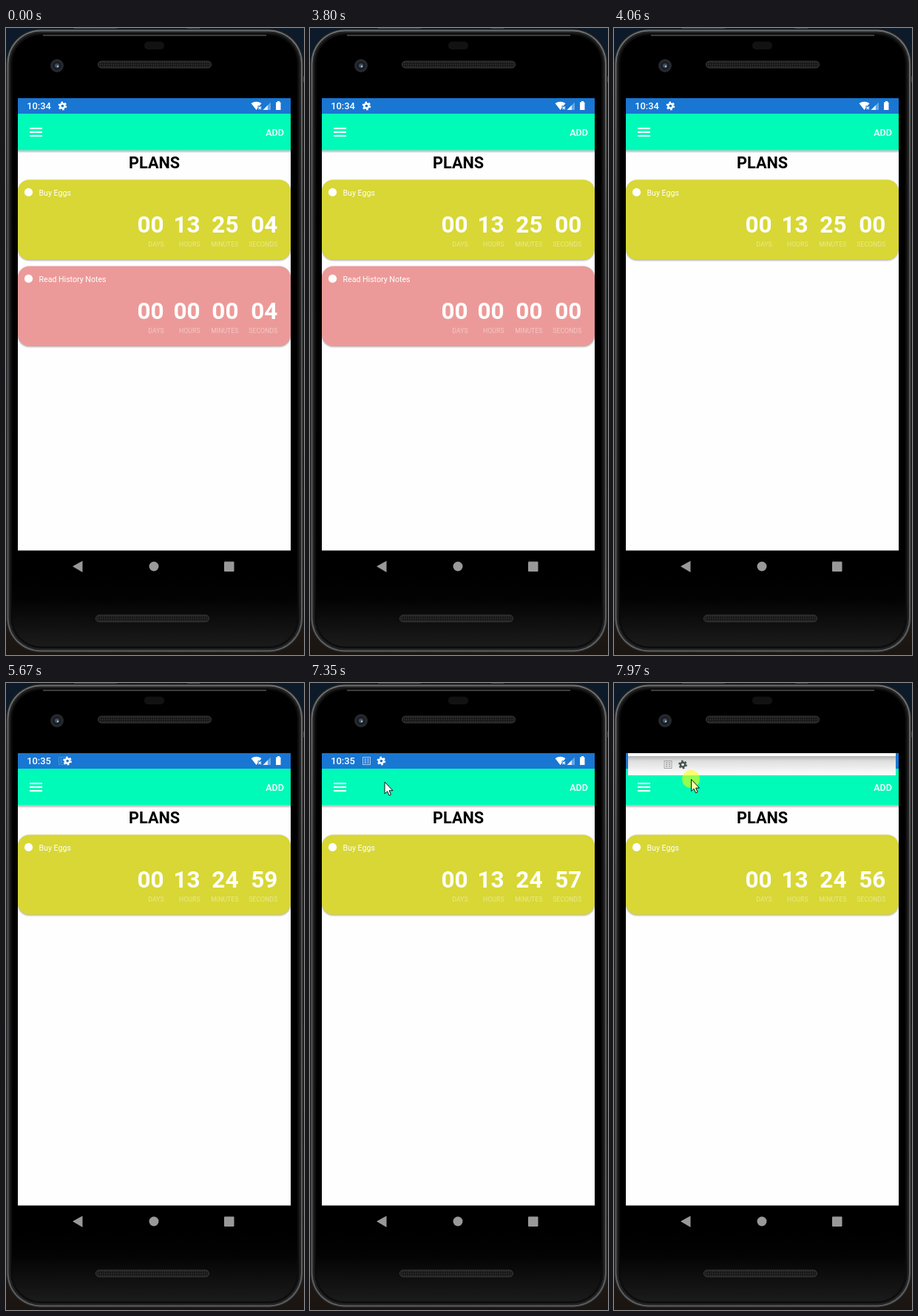
Recreate the animation shown at these times as an HTML page. Size 403x849 px, loop 8 s.

```html
<!DOCTYPE html>
<html lang="en">
<head>
<meta charset="utf-8">
<title>Plans countdown</title>
<style>
  html, body { margin: 0; width: 100%; height: 100%; overflow: hidden; background: #0b1724; }
  svg { display: block; width: 403px; height: 849px; font-family: Roboto, "Open Sans", sans-serif; }
  .num { font-weight: 700; font-size: 31.5px; fill: #fff; text-anchor: end; }
  .unit { font-size: 8.75px; fill: #fff; fill-opacity: .45; text-anchor: end; }
  .name { font-size: 10.6px; fill: #fff; }
  .medium { font-weight: 500; fill: #fff; }
  .card { filter: drop-shadow(0 1.2px 1px rgba(0, 0, 0, .35)); }
</style>
</head>
<body>
<svg viewBox="0 0 403 849">
  <defs>
    <linearGradient id="back" x2="0" y2="1">
      <stop offset="0" stop-color="#0c1a2a"/><stop offset=".6" stop-color="#10151d"/>
      <stop offset=".8" stop-color="#2c231d"/><stop offset="1" stop-color="#1a1511"/>
    </linearGradient>
    <linearGradient id="rim" x2="0" y2="1">
      <stop offset="0" stop-color="#6e7070"/><stop offset=".3" stop-color="#515353"/>
      <stop offset="1" stop-color="#5c5e5e"/>
    </linearGradient>
    <linearGradient id="chin" x2="0" y2="1">
      <stop offset="0" stop-color="#000"/><stop offset=".35" stop-color="#030303"/>
      <stop offset="1" stop-color="#1b1b1b"/>
    </linearGradient>
    <linearGradient id="barShade" x2="0" y2="1">
      <stop offset="0" stop-color="#000" stop-opacity=".32"/><stop offset="1" stop-color="#000" stop-opacity="0"/>
    </linearGradient>
    <linearGradient id="panelFill" x2="0" y2="1">
      <stop offset="0" stop-color="#b4b4b4"/><stop offset=".25" stop-color="#dedede"/>
      <stop offset="1" stop-color="#fff"/>
    </linearGradient>
    <pattern id="mesh" width="3" height="3" patternUnits="userSpaceOnUse">
      <rect width="3" height="3" fill="#161616"/><circle cx="1.5" cy="1.5" r=".9" fill="#323232"/>
    </pattern>
    <clipPath id="screen"><rect x="16" y="95" width="369" height="612.5"/></clipPath>
    <g id="gear" fill="none" stroke="currentColor">
      <circle r="3.1" stroke-width="2.5"/>
      <circle r="4.8" stroke-width="2.2" stroke-dasharray="2.51"/>
    </g>
    <g id="sheet" fill="none" stroke="currentColor">
      <rect x="-5" y="-5" width="10" height="10"/>
      <path d="M-3-2.5H-.5M-3 0H-.5M-3 2.5H-.5M.8-2.5H3.2M.8 0H3.2M.8 2.5H3.2" stroke-width="1.3"/>
    </g>
  </defs>

  <!-- phone body -->
  <rect width="403" height="849" fill="url(#back)"/>
  <path d="M92 .5H150M245 .5H262M308 2H320" stroke="#35424e"/>
  <path d="M0 69.5H7M396 69.5H403M0 235H6" stroke="#707070" stroke-width="8"/>
  <path d="M402 275V350M402 462V580" stroke="#151f2c" stroke-width="2"/>
  <path d="M64 844H78M323 844H337" stroke="#5a5a5a" stroke-width="4"/>
  <rect x="0" y="1" width="402.5" height="845" rx="47" fill="#1f2021"/>
  <rect x="1.5" y="2.5" width="399.5" height="842" rx="45.5" fill="url(#rim)"/>
  <rect x="3.5" y="4.5" width="395.5" height="838" rx="43.5" fill="#222"/>
  <rect x="6" y="7" width="390.5" height="833" rx="41" fill="#0d0d0d"/>
  <rect x="8.5" y="9.500" width="385.5" height="828" rx="38.5" fill="#000"/>
  <path d="M50 10H352" stroke="#727878"/>
  <path d="M8.5 740H394V799A38.5 38.5 0 0 1 355.5 837.5H47A38.5 38.5 0 0 1 8.5 799Z" fill="url(#chin)"/>
  <rect x="187" y="18.5" width="27" height="10.5" rx="5" fill="#121212"/>
  <g fill="url(#mesh)" stroke="#3d3d3d">
    <rect x="124.5" y="45" width="153" height="9" rx="4.5"/>
    <rect x="121.5" y="795" width="153" height="9" rx="4.5"/>
  </g>
  <circle cx="69" cy="51" r="9" fill="#26282b"/>
  <circle cx="69" cy="51" r="5.5" fill="#171d25"/>
  <circle cx="69" cy="51" r="3" fill="#414f60"/>
  <circle cx="70" cy="52" r="1.2" fill="#b4c2ce"/>
  <g fill="#999">
    <path d="M90 729L103.5 721.5V737Z"/>
    <circle cx="200" cy="729" r="6.5"/>
    <rect x="295" y="722.5" width="13.5" height="13.5" rx="1"/>
  </g>

  <!-- app -->
  <g clip-path="url(#screen)">
    <rect x="16" y="95" width="369" height="613" fill="#fefefe"/>
    <rect x="16" y="165.5" width="369" height="4" fill="url(#barShade)"/>
    <rect x="16" y="116" width="369" height="49.5" fill="#00fbb9"/>
    <rect x="16" y="95" width="369" height="21" fill="#1976d2"/>
    <g color="#fff">
      <text id="clock" class="medium" x="28.2" y="110.4" font-size="12.9"></text>
      <use id="news" href="#sheet" color="#a9cbee"/>
      <use id="cog" href="#gear"/>
    </g>
    <path d="M331.5 102Q338.5 97.5 345.5 102L343 105.2H340.5V108.5L338.5 111Z" fill="#fff"/>
    <path d="M341.5 106.5L345 110M345 106.5L341.5 110" stroke="#fff" stroke-width="1.1"/>
    <path d="M347.5 111L358 100.5V111Z" fill="#fff" fill-opacity=".35"/>
    <path d="M347.5 111L354 104.5V111Z" fill="#fff" fill-opacity=".8"/>
    <path d="M365 100.5H367V99H370V100.5H371.5V111H365Z" fill="#fff"/>
    <path d="M32 136H49M32 141H49M32 146H49" stroke="#fff" stroke-width="2"/>
    <text class="medium" x="376" y="146" font-size="12.6" text-anchor="end">ADD</text>
    <text x="200.6" y="189.5" font-size="21.7" font-weight="700" text-anchor="middle">PLANS</text>
    <g id="cards"></g>

    <!-- pull-down panel -->
    <g id="panel">
      <rect id="panelBox" x="19" y="95" width="362" height="30" fill="#fff"/>
      <rect id="panelTone" x="19" y="99" width="362" height="26" fill="url(#panelFill)"/>
      <g id="panelIcons">
        <use href="#sheet" x="73" color="#a5a5a5"/>
        <use href="#gear" x="93" color="#46544f"/>
      </g>
    </g>
  </g>

  <!-- pointer -->
  <g id="pointer">
    <circle id="press" r="12" fill-opacity=".58"/>
    <path id="arrow" d="M.5 .5V16.5L4.1 13.2L6.6 18.8L9 17.7L6.6 12.2H11.5Z" stroke="#111"/>
  </g>
</svg>
<script>
  const LOOP = 8000, MOVE_START = 6470, TICK = 68;
  const $ = id => document.getElementById(id);
  const set = (id, attrs) => { for (const k in attrs) $(id).setAttribute(k, attrs[k]); };
  const show = (id, on) => set(id, { visibility: on ? 'visible' : 'hidden' });
  const pad = n => String(n).padStart(2, '0');

  const columns = [['DAYS', 213.6], ['HOURS', 262.6], ['MINUTES', 314.5], ['SECONDS', 367.3]];

  function card(id, name, y, color) {
    const cells = columns.map(([unit, x]) =>
      `<text class="num" x="${x}" y="71.6">00</text><text class="unit" x="${x}" y="91">${unit}</text>`);
    return `<g id="${id}" transform="translate(0 ${y})">
      <rect class="card" x="16" width="369" height="108.3" rx="15.5" fill="${color}"/>
      <circle cx="30.5" cy="17" r="5.6" fill="#fff"/>
      <text class="name" x="44.5" y="21.2">${name}</text>${cells.join('')}</g>`;
  }
  $('cards').innerHTML =
    card('eggs', 'Buy Eggs', 205.4, '#d8d735') + card('notes', 'Read History Notes', 322.4, '#ec9a99');

  const setDigits = (id, values) => document.querySelectorAll(`#${id} .num`)
    .forEach((el, i) => { el.textContent = pad(values[i]); });

  // Times at which the countdown loses one second
  const beats = [850, 2000, 2930, 3800, 5140, 6210, 6742, 7762];

  // Pointer path: tick, x, y
  const path = [
    [0, 325, 832], [2, 295, 560], [4, 246, 353], [7, 160, 225], [11, 99, 145],
    [13, 102, 122], [16, 104, 101], [18, 104, 103], [20, 104, 116], [22, 104, 130]
  ];

  function pointAt(tick) {
    const i = Math.max(1, path.findIndex(p => p[0] >= tick));
    const [a, b] = [path[i - 1], path[i]];
    const u = (tick - a[0]) / (b[0] - a[0]);
    return [a[1] + (b[1] - a[1]) * u, a[2] + (b[2] - a[2]) * u];
  }

  function drawPointer(t) {
    const tick = Math.min(22, Math.floor((t - MOVE_START) / TICK));
    const pressed = tick >= 17, pulling = tick >= 21;
    show('pointer', tick >= 0);
    show('panel', pulling);
    set('press', { opacity: pressed ? 1 : 0, fill: pulling ? '#ff0' : '#d8c400' });
    set('arrow', { fill: pressed ? '#ffffa8' : '#fff' });
    if (tick < 0) return;
    const [x, y] = pointAt(tick);
    const bottom = y - 5;
    set('pointer', { transform: `translate(${x} ${y})` });
    set('panelBox', { height: Math.max(0, bottom - 95) });
    set('panelTone', { height: Math.max(0, bottom - 99) });
    set('panelIcons', { transform: `translate(0 ${bottom - 14.5})` });
  }

  function draw(t) {
    const left = 13 * 3600 + 25 * 60 + 4 - beats.filter(b => t >= b).length;
    setDigits('eggs', [0, Math.floor(left / 3600), Math.floor(left / 60) % 60, left % 60]);
    setDigits('notes', [0, 0, 0, Math.max(0, left - 13 * 3600 - 25 * 60)]);
    set('notes', { opacity: t < 3990 ? 1 : t < 4060 ? 0.5 : 0 });
    $('clock').textContent = t < 4660 ? '10:34' : '10:35';

    // New notification slides the gear aside in three steps
    const step = Math.min(3, Math.max(0, Math.floor((t - 5600) / 70))) / 3;
    set('cog', { transform: `translate(${76.4 + 20 * step} 105.5)` });
    set('news', { transform: 'translate(76.5 105.5)', opacity: step });
    drawPointer(t);
  }

  const start = performance.now();
  function loop() {
    draw((performance.now() - start) % LOOP);
    requestAnimationFrame(loop);
  }
  loop();
</script>
</body>
</html>
```
